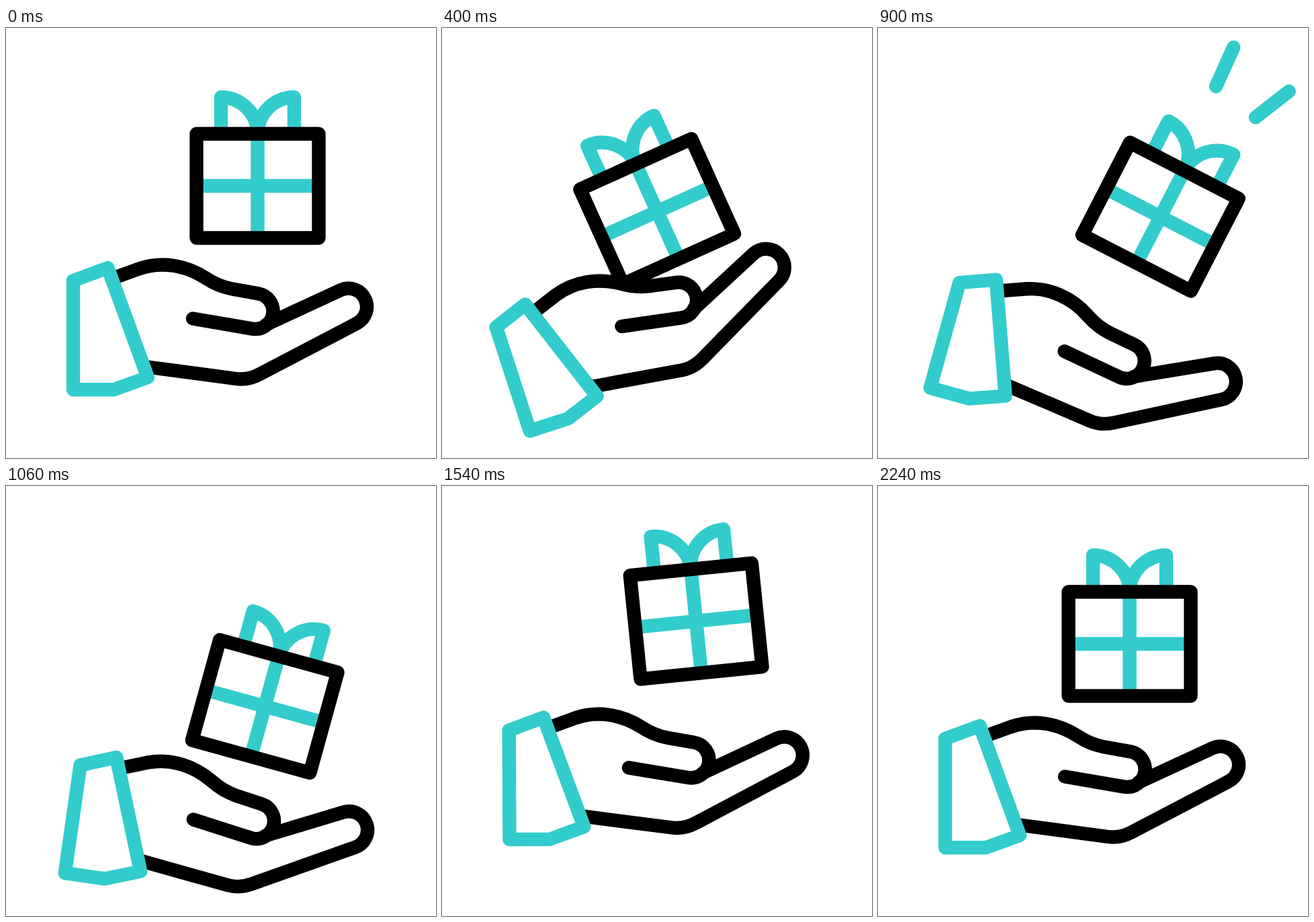
Recreate the animation shown at these times as an HTML page. Size 640 by 640 pixels, loop 2400 ms.

```html
<!DOCTYPE html>
<html lang="en">
<head>
<meta charset="utf-8">
<title>Gift toss</title>
<style>
  html, body { margin: 0; width: 100%; height: 100%; overflow: hidden; background: #fff; }
  svg { display: block; width: 100%; height: 100%; }

  path, rect {
    fill: none;
    stroke: #000;
    stroke-width: 20.4;
    stroke-linecap: round;
    stroke-linejoin: round;
  }
  .teal { stroke: #33cccc; }
  .flat { stroke-linecap: butt; }

  g, .spark {
    animation: 2400ms cubic-bezier(.3333, 0, .6667, 1) infinite;
  }
  .hand { transform-origin: 155.5px 447.5px; animation-name: hand-lift, hand-turn; }
  .sway { animation-name: gift-sway; }
  .gift { transform-origin: 374.5px 235px; animation-name: gift-lift, gift-turn; }
  .spark { stroke-dasharray: 0 9; opacity: 0; animation-name: spark; }

  @keyframes hand-lift {
    0%     { translate: 0 0; }
    19.17% { translate: 0 51px; }
    30.83% { translate: 0 -24px; }
    43.33% { translate: 0 47px; }
    61.04% { translate: 0 -18.3px; }
    73.33% { translate: 0 16.5px; }
    90%, 100% { translate: 0 0; }
  }
  @keyframes hand-turn {
    0%     { rotate: 0deg; }
    20.83% { rotate: -20deg; }
    38.33% { rotate: 15.7deg; }
    53.75% { rotate: -7.7deg; }
    71.25% { rotate: 3.8deg; }
    86.67%, 100% { rotate: 0deg; }
  }
  @keyframes gift-sway {
    0%     { translate: 0 0; }
    19.58% { translate: -57.6px 0; }
    35%    { translate: 50px 0; }
    52.5%  { translate: -22.8px 0; }
    66.67% { translate: 6px 0; }
    90%, 100% { translate: 0 0; }
  }
  @keyframes gift-lift {
    0%     { translate: 0 0; }
    19.58% { translate: 0 40.5px; }
    30.42% { translate: 0 -4px; }
    44.38% { translate: 0 93px; }
    62.5%  { translate: 0 -39px; }
    73.33% { translate: 0 38px; }
    93.33%, 100% { translate: 0 0; }
  }
  @keyframes gift-turn {
    0%     { rotate: 0deg; }
    20.83% { rotate: -27.1deg; }
    35.42% { rotate: 28.2deg; }
    58.75% { rotate: -11.9deg; }
    73.33% { rotate: 7.4deg; }
    90%, 100% { rotate: 0deg; }
  }
  @keyframes spark {
    0%, 32.49% { opacity: 0; stroke-dasharray: 0 9; stroke-dashoffset: 0; }
    32.5%  { opacity: 1; stroke-dasharray: 0 9; }
    38.75% { stroke-dasharray: 1 9; stroke-dashoffset: 0; }
    44.16% { opacity: 1; stroke-dashoffset: -.99; }
    44.17%, 100% { opacity: 0; stroke-dasharray: 1 9; stroke-dashoffset: -.99; }
  }
</style>
</head>
<body>
<svg viewBox="0 0 640 640">
  <g class="hand">
    <path d="M157.5 373 L199 358 C232 347 268 353 297 372 C309 380 322 385.500 336 388.300
             L375.700 395.400 A26.500 26.500 0 0 1 366.300 447.600 L278 432.500"/>
    <path d="M388 441 L498.300 390 A27.500 27.500 0 0 1 522.600 439.300 L378 515
             C367 521 354 523.700 342 522 L206.500 504"/>
    <path class="teal" d="M100 376 L151.500 357 L211 520 L160 538.300 H100 Z"/>
  </g>
  <g class="sway">
    <g class="gift">
      <path class="teal flat" d="M320 157.500 V103 A54.500 54.500 0 0 1 374.500 157.500
                                 A54.500 54.500 0 0 1 429 103 V157.500"/>
      <path class="teal flat" d="M374.500 157.500 V312.500 M283.500 235 H465.500"/>
      <rect x="283.500" y="157.500" width="182" height="155"/>
    </g>
  </g>
  <path class="teal spark" pathLength="1" d="M503 87 L532 22.500"/>
  <path class="teal spark" pathLength="1" d="M562 133 L617 90"/>
</svg>
</body>
</html>
```
